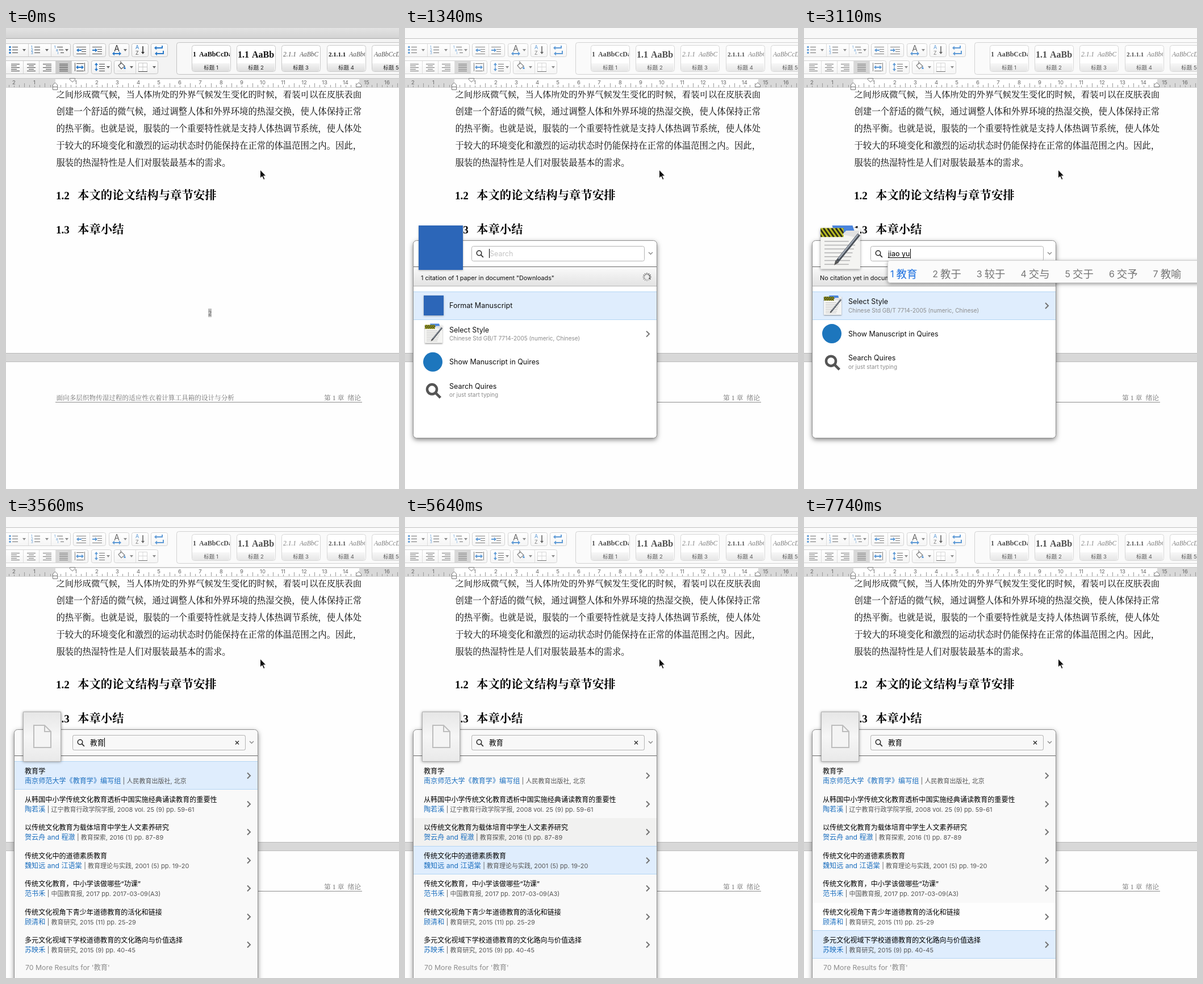
These frames come from a looping animation (692x810 px, 8 s). An HTML page with a canvas:

```html
<!DOCTYPE html>
<html lang="zh-CN">
<head>
<meta charset="utf-8">
<title>Citation search</title>
<style>
html, body { margin: 0; width: 100%; height: 100%; overflow: hidden; background: #fff; }
canvas { display: block; width: 692px; height: 810px; }
</style>
</head>
<body>
<canvas id="stage"></canvas>
<script>
const W = 692, H = 810, LOOP = 8000;
const canvas = document.getElementById('stage');
const g = canvas.getContext('2d');
const ratio = window.devicePixelRatio || 1;
canvas.width = W * ratio;
canvas.height = H * ratio;

const SANS = "Inter, 'Noto Sans CJK SC', 'Noto Sans CJK', sans-serif";
const SERIF = "'Liberation Serif', 'Noto Serif CJK SC', 'Noto Sans CJK SC', 'Noto Sans CJK', serif";
const BLUE = '#1c6fbf', INK = '#111';

// ---------- helpers ----------
function text(str, x, y, size, color = INK, style = '', family = SANS, align = 'left') {
  g.font = `${style} ${size}px ${family}`;
  g.fillStyle = color;
  g.textAlign = align;
  g.fillText(str, x, y);
  return g.measureText(str).width;
}
function rect(x, y, w, h, color) {
  g.fillStyle = color;
  g.fillRect(x, y, w, h);
}
function box(x, y, w, h, r, fill, stroke) {
  g.beginPath();
  g.roundRect(x + .5, y + .5, w, h, r);
  if (fill) { g.fillStyle = fill; g.fill(); }
  if (stroke) { g.strokeStyle = stroke; g.lineWidth = 1; g.stroke(); }
}
function path(points, color, width = 1, fill) {
  g.beginPath();
  points.forEach(([x, y], i) => i ? g.lineTo(x, y) : g.moveTo(x, y));
  if (fill) { g.closePath(); g.fillStyle = fill; g.fill(); }
  if (color) { g.strokeStyle = color; g.lineWidth = width; g.stroke(); }
}
function disc(x, y, r, fill, stroke, width = 1) {
  g.beginPath();
  g.arc(x, y, r, 0, Math.PI * 2);
  if (fill) { g.fillStyle = fill; g.fill(); }
  if (stroke) { g.strokeStyle = stroke; g.lineWidth = width; g.stroke(); }
}
function fade(y0, y1, ...colors) {
  const grad = g.createLinearGradient(0, y0, 0, y1);
  colors.forEach((c, i) => grad.addColorStop(i / (colors.length - 1), c));
  return grad;
}
function shadow(blur, dy, color) {
  g.shadowBlur = blur;
  g.shadowOffsetY = dy;
  g.shadowColor = color;
}
function layer(draw) { g.save(); draw(); g.restore(); }
// value of the latest [time, value] entry
function at(t, steps) {
  let value = steps[0][1];
  for (const [time, v] of steps) if (t >= time) value = v;
  return value;
}

// ---------- toolbar ----------
function lines(x, y, widths, color = '#444', gap = 3) {
  widths.forEach(([dx, w], i) => rect(x + dx, y + i * gap, w, 1, color));
}
function button(x, y, w, splits = []) {
  box(x, y, w, 23, 3, fade(y, y + 23, '#fff', '#f1f1f1'), '#c4c4c4');
  splits.forEach(s => rect(s, y + 1, 1, 22, '#d2d2d2'));
}
function drop(x, y) { path([[x - 3, y - 2], [x + 3, y - 2], [x, y + 2]], null, 0, '#666'); }
function arrow(x, y, dx, color = '#2878c8') {
  const s = Math.sign(dx);
  path([[x, y], [x + dx - s * 2, y]], color, 2);
  path([[x + dx, y], [x + dx - s * 4, y - 3.5], [x + dx - s * 4, y + 3.5]], null, 0, color);
}
function upDown(x, y, dy, color = '#2878c8') {
  const s = Math.sign(dy);
  path([[x, y], [x, y + dy - s * 2]], color, 1.6);
  path([[x, y + dy], [x - 3, y + dy - s * 4], [x + 3, y + dy - s * 4]], null, 0, color);
}
function toolRows() {
  button(-4, 27, 117, [39, 79]);
  for (let i = 0; i < 3; i++) {
    const y = 33 + i * 5;
    disc(7, y + .5, 1.8, '#2878c8');
    rect(11, y, 10, 1, '#444');
    text(i + 1, 44, y + 3, 6, '#2878c8');
    rect(50, y, 10, 1, '#444');
    text('1ai'[i], 85 + i * 3, y + 3, 6, '#2878c8');
    rect(90 + i * 3, y, 10 - i * 2, 1, '#444');
  }
  [32, 72, 107].forEach(x => drop(x, 39));

  button(118, 27, 57, [147]);
  [124, 152].forEach((x, i) => {
    lines(x, 33, [[0, 17], [9, 8], [9, 8], [0, 17]], '#555', 4);
    arrow(i ? x : x + 9, 39, i ? 9 : -9);
  });
  button(181, 27, 35);
  text('A', 195, 41, 14, '#333', '', SANS, 'center');
  arrow(195, 45, 8);
  arrow(195, 45, -8);
  drop(210, 39);
  button(221, 27, 29);
  text('A', 228, 37, 9, '#2878c8');
  text('Z', 228, 47, 9, '#555');
  upDown(241, 32, 14, '#333');
  button(255, 27, 29);
  path([[275, 31], [275, 35], [266, 35]], '#2878c8', 2);
  arrow(270, 35, -9);
  path([[277, 40], [277, 45], [268, 45]], '#2878c8', 2);
  arrow(274, 45, -12);

  button(-4, 57, 148, [30, 58, 87, 115]);
  rect(88, 58, 27, 22, '#cbcbcb');
  const full = [0, 15];
  lines(9, 63, [full, [0, 10], full, [0, 10], full]);
  lines(37, 63, [full, [3, 9], full, [3, 9], full]);
  lines(65, 63, [full, [5, 10], full, [5, 10], full]);
  lines(94, 63, [full, full, full, full, full]);
  lines(122, 62, [[2, 13], [2, 13]], '#444', 13);
  rect(121, 61, 1, 15, '#555');
  rect(138, 61, 1, 15, '#555');
  arrow(130, 69, 7);
  arrow(130, 69, -7);

  button(150, 57, 35);
  upDown(159, 68, -7);
  upDown(159, 69, 7);
  lines(164, 63, [[0, 10], [0, 10], [0, 10], [0, 10]], '#444', 4);
  drop(180, 69);
  button(190, 57, 77, [228]);
  path([[198, 66], [203, 61], [209, 67], [203, 72]], '#555', 1.2, '#fafafa');
  path([[202, 64], [202, 58]], '#555', 1);
  path([[209, 67], [211, 72], [207, 72]], null, 0, '#2878c8');
  rect(196, 74, 15, 3, '#eee');
  drop(221, 69);
  box(233, 61, 15, 15, 0, '#fff', '#c8c8c8');
  path([[241, 61], [241, 76]], '#c8c8c8');
  path([[233, 68.5], [249, 68.5]], '#c8c8c8');
  path([[233, 76.5], [249, 76.5]], '#444');
  drop(261, 69);
}
function styleCards() {
  box(300, 25, 420, 56, 4, '#f8f8f8', '#c2c2c2');
  const cards = [
    [['1', 2, 'bold', 12], ['AaBbCcDa', 13, 'bold', 12]],
    [['1.1', 2, 'bold', 16], ['AaBb', 27, 'bold', 16]],
    [['2.1.1', 3, 'italic', 11.5, '#555'], ['AaBbC', 32, 'italic', 11.5, '#555']],
    [['2.1.1.1', 3, 'bold', 11], ['AaBbC', 39, 'italic', 11.5, '#555']],
    [['AaBbCcDa', 4, 'italic', 11.5, '#555']]
  ];
  cards.forEach((parts, i) => {
    const x = 327 + Math.round(i * 79.2);
    box(x, 30, 68, 46, 4, '#fff', '#c9c9c9');
    layer(() => {
      g.beginPath();
      g.roundRect(x + 1, 31, 66, 45, 3);
      g.clip();
      rect(x, 62, 69, 15, fade(62, 76, '#f4f4f4', '#dedede'));
      parts.forEach(([s, dx, style, size, color]) =>
        text(s, x + dx, size > 13 ? 52 : 50, size, color || INK, style, SERIF));
    });
    text('标题 ' + (i + 1), x + 34, 73, 9.5, '#222', '', SANS, 'center');
  });
}
function ruler() {
  rect(0, 88, W, 17, '#d9d9d9');
  rect(87, 90, 535, 15, '#fff');
  rect(0, 88, W, 1, '#c6c6c6');
  for (let q = -9; q <= 67; q++) {
    const x = Math.round(86.7 + q * 36.52 / 4);
    const m = ((q % 4) + 4) % 4;
    if (m) rect(x, m === 2 ? 97 : 100, 1, m === 2 ? 7 : 4, '#999');
    else {
      rect(x, 101, 1, 3, '#999');
      if (q) text(Math.abs(q / 4), x, 99, 9.5, '#666', '', SANS, 'center');
    }
  }
  rect(0, 104, W, 1, '#d0d0d0');
  path([[82.5, 109], [82.5, 100], [86.5, 96], [90.5, 100], [90.5, 109]], null, 0, '#fff');
  path([[82.5, 108.5], [82.5, 100], [86.5, 96], [90.5, 100], [90.5, 108.5], [82.5, 108.5]], '#777');
  path([[82.5, 103.5], [90.5, 103.5]], '#777');
  path([[616.5, 103.5], [616.5, 100], [621, 96], [625.5, 100], [625.5, 103.5], [616.5, 103.5]], '#777', 1, '#fff');
  path([[112.5, 88.5], [121.5, 88.5], [121.5, 91], [117, 95], [112.5, 91], [112.5, 88.5]], '#777', 1, '#fff');
}
function toolbar(active) {
  rect(0, 0, W, 18, active ? fade(0, 18, '#e3e3e3', '#d3d3d3') : '#f5f5f5');
  rect(0, 18, W, 1, '#aaa');
  rect(0, 19, W, 69, active ? '#f3f3f3' : '#f9f9f9');
  toolRows();
  styleCards();
  if (!active) rect(0, 0, W, 88, 'rgba(255,255,255,.25)');
  ruler();
}

// ---------- document ----------
const BODY = [
  '之间形成微气候，当人体所处的外界气候发生变化的时候，着装可以在皮肤表面',
  '创建一个舒适的微气候，通过调整人体和外界环境的热湿交换，使人体保持正常',
  '的热平衡。也就是说，服装的一个重要特性就是支持人体热调节系统，使人体处',
  '于较大的环境变化和激烈的运动状态时仍能保持在正常的体温范围之内。因此，',
  '服装的热湿特性是人们对服装最基本的需求。'
];
function page(caret) {
  rect(0, 0, W, H, '#fefefe');
  BODY.forEach((s, i) => text(s, 88.5, 122 + i * 30.1, 15.36, '#000', '500', SERIF));
  if (caret) rect(383, 231, 1, 16, '#000');
  [['1.2', '本文的论文结构与章节安排', 301], ['1.3', '本章小结', 361]].forEach(([n, s, y]) => {
    text(n, 88, y, 19, '#000', 'bold', SERIF);
    text(s, 126, y, 20.4, '#000', 'bold', SERIF);
  });
  rect(356, 493, 6, 15, '#c0c0c0');
  text('2', 359, 505, 11.5, '#666', '', SERIF, 'center');
  rect(0, 571, W, 16, '#d8d8d8');
  rect(0, 571, W, 1, '#b9b9b9');
  rect(0, 586, W, 1, '#bcbcbc');
  text('面向多层织物传湿过程的适应性衣着计算工具箱的设计与分析', 88.5, 653.5, 11.62, '#6c6c6c', '500', SERIF);
  text('第 1 章  绪论', 625, 653.5, 11.8, '#6c6c6c', '500', SERIF, 'right');
  rect(87, 657, 540, 1, '#8c8c8c');
}
function pointer() {
  path([[447.5, 249], [447.5, 264], [451, 260.8], [453.6, 266.6], [456, 265.5], [453.4, 259.9], [458, 259.9], [447.5, 249]],
    '#fff', 1, '#111');
}

// ---------- panel ----------
function lens(x, y, r, width, color) {
  disc(x, y, r, null, color, width);
  const d = r * .75;
  path([[x + d, y + d], [x + d + r, y + d + r]], color, width);
}
function chevron(x, y) { path([[x - 3, y - 5], [x + 2, y], [x - 3, y + 5]], '#737373', 2); }

function notepad(x, y, k) {
  layer(() => {
    g.translate(x, y);
    g.scale(k, k);
    shadow(2 * k, 1, 'rgba(0,0,0,.4)');
    rect(1, 2, 31, 32, '#f4f4f2');
    shadow(0, 0, 'transparent');
    path([[10, 0], [26, 0], [28, 6], [12, 6]], null, 0, '#4a84dc');
    rect(1, 2, 18, 7, '#b9bd22');
    layer(() => {
      g.beginPath();
      g.rect(1, 2, 18, 7);
      g.clip();
      for (let i = -1; i < 7; i++) path([[i * 3.2, 2], [i * 3.2 + 5, 9]], '#2b2b1c', 1.3);
    });
    for (let i = 0; i < 7; i++) rect(4, 12 + i * 3, 19 + (i * 5) % 6, .7, '#b5b5b5');
    path([[18, 7], [21, 4], [31, 4], [32, 13], [27, 9]], null, 0, '#e2e2e2');
    path([[31, 7], [14, 28]], '#4a5058', 2.6);
    path([[30.4, 7], [15, 26]], '#a3acb8', 1);
    path([[15.3, 29], [12.7, 27], [11.6, 31]], null, 0, '#555');
  });
}
function emptyTile() {
  layer(() => {
    shadow(5, 1, 'rgba(0,0,0,.45)');
    rect(30, 342, 67, 87, '#eee');
  });
  box(30, 342, 66, 87, 0, fade(342, 429, '#e6e6e6', '#f6f6f6', '#e9e9e9'), '#b0b0b0');
  path([[49, 366], [68, 366], [79, 377], [79, 405], [49, 405], [49, 365]], '#bdbdbd', 2, '#f4f4f4');
  path([[68, 366], [68, 377], [79, 377]], '#bdbdbd', 2);
}
function square(x, y, s) {
  layer(() => {
    shadow(3, 1, 'rgba(0,0,0,.3)');
    rect(x, y, s, s, '#2c66b8');
  });
}
function frame(height, fill) {
  layer(() => {
    shadow(9, 3, 'rgba(0,0,0,.5)');
    box(14, 373, 429, height, 6, fill);
  });
  box(14, 373, 429, height, 6, fill, '#8f8f8f');
  rect(15, 419, 428, 1, '#666');
  box(117, 383, 304, 26, 3, '#fff', '#b4b4b4');
  lens(130.5, 395.5, 4.2, 1.5, '#222');
  path([[429, 394], [432.5, 397.5], [436, 394]], '#888', 1.4);
}
function selection(y, h) {
  rect(15, y, 428, h, '#dfedfd');
  rect(15, y, 428, 1, '#b4d6f4');
  rect(15, y + h - 1, 428, 1, '#b4d6f4');
}
function spinner(step) {
  for (let i = 0; i < 12; i++) {
    const a = (i + step) * Math.PI / 6, c = Math.cos(a), s = Math.sin(a);
    path([[426 + c * 4, 437.5 + s * 4], [426 + c * 7.5, 437.5 + s * 7.5]], `rgba(40,40,40,${.25 + i * .06})`, 1.5);
  }
}

const MENU = [
  ['Format Manuscript', '', (y) => square(33, y + 7, 35)],
  ['Select Style', 'Chinese Std GB/T 7714-2005 (numeric, Chinese)', (y) => notepad(34, y + 7, 1)],
  ['Show Manuscript in Quires', '', (y) => disc(49, y + 24.5, 17, '#1d76bd')],
  ['Search Quires', 'or just start typing', (y) => lens(47.5, y + 23, 8.5, 4.5, '#555')]
];
function menuPanel(cited, step) {
  frame(347, '#fff');
  rect(15, 420, 428, 34, fade(420, 454, '#fafafa', '#e2e2e2'));
  rect(15, 453, 428, 1, '#b5b5b5');
  text((cited ? '1 citation of 1 paper' : 'No citation yet') + ' in document "Downloads"', 28, 442.5, 10.8);
  if (cited) spinner(step);
  selection(463, 50);
  MENU.slice(cited ? 0 : 1).forEach(([title, note, icon], i) => {
    const y = 463 + i * 49.6;
    icon(y);
    text(title, 78, y + (note ? 22 : 29), 12.5);
    if (note) text(note, 78, y + 36.5, 10, '#8c8c8c');
    if (title === 'Select Style') chevron(428, y + 25);
  });
  if (cited) square(24, 347, 78);
  else notepad(27, 347, 2.25);
}

const IME = [
  [2080, 'j', '就 级 家 及 将 句 加 其'],
  [2220, 'ji', '及 级 几 机 记 即 急 集'],
  [2370, 'jiao', '叫 教 较 交 脚 角 觉 焦'],
  [2970, 'jiao y', '教育 教 叫 交易 较 交 脚 教研'],
  [3110, 'jiao yu', '教育 教于 较于 交与 交于 交予 教喻 郊域']
];
function compose(t) {
  const [, typed, list] = IME.filter(e => t >= e[0]).pop();
  const w = text(typed, 148, 401, 12.5, '#000');
  rect(148, 403, w, 1, '#000');
  rect(Math.round(148 + w), 388, 1, 17, '#000');
  const words = list.split(' ');
  const width = words.reduce((sum, s) => sum + 41 + s.length * 18.4, -20);
  layer(() => {
    shadow(7, 2, 'rgba(0,0,0,.45)');
    box(147, 408, width, 39, 4, '#fbfbfb');
  });
  box(147, 408, width, 39, 4, '#fbfbfb', '#d0d0d0');
  let x = 152;
  words.forEach((s, i) => {
    const color = i ? '#757575' : '#1a6fe0';
    x += text(i + 1, x, 438, 16, color) + 4;
    x += text(s, x, 438.5, 18.4, color) + 27;
  });
}

const RESULTS = [
  ['教育学', '南京师范大学《教育学》编写组', '人民教育出版社, 北京'],
  ['从韩国中小学传统文化教育透析中国实施经典诵读教育的重要性', '陶若溪', '辽宁教育行政学院学报, 2008 vol. 25 (9) pp. 59-61'],
  ['以传统文化教育为载体培育中学生人文素养研究', '贺云舟 and 程澈', '教育探索, 2016 (1) pp. 87-89'],
  ['传统文化中的道德素质教育', '魏知远 and 江语棠', '教育理论与实践, 2001 (5) pp. 19-20'],
  ['传统文化教育，中小学该做哪些“功课”', '范书禾', '中国教育报, 2017 pp. 2017-03-09(A3)'],
  ['传统文化视角下青少年道德教育的活化和链接', '顾清和', '教育研究, 2015 (11) pp. 25-29'],
  ['多元文化视域下学校道德教育的文化路向与价值选择', '苏映禾', '教育研究, 2015 (9) pp. 40-45']
];
const PICK = [[3560, 0], [4450, 1], [5040, 2], [5640, 3], [6240, 4], [6840, 5], [7740, 6]];
const BLINK = [[3560, 1], [4000, 0], [4590, 1], [5190, 0], [5790, 1], [6240, 0], [6840, 1], [7440, 0]];
// tint left for a moment on the row just passed
const TRAIL = [[0, ''], [4450, '#f5f5f5'], [4590, ''], [5640, '#f1f1f0'], [5790, ''], [7740, '#fefefe']];

function resultPanel(t) {
  const pick = at(t, PICK), trail = at(t, TRAIL);
  frame(500, '#f9f9f9');
  box(117, 383, 304, 26, 3, '#f8f8f8', '#b4b4b4');
  lens(130.5, 395.5, 4.2, 1.5, '#222');
  text('教育', 148, 401, 12.6, '#000');
  if (at(t, BLINK)) rect(173, 388, 1, 16, '#000');
  path([[404, 393.5], [410, 399.5]], '#333', 1.5);
  path([[410, 393.5], [404, 399.5]], '#333', 1.5);
  RESULTS.forEach(([title, author, origin], i) => {
    const y = Math.round(430.3 + i * 49.5);
    if (i === pick) selection(y - 1, 50);
    else if (trail && i === pick - 1) rect(15, y, 428, 49, trail);
    text(title, 33, y + 20.5, 12.1, '#000');
    const w = text(author, 33, y + 38, 12.1, BLUE);
    text('| ' + origin, 33 + w + 3.5, y + 38, 11, '#555');
    chevron(428, y + 24.5);
  });
  text("70 More Results for '教育'", 34, 796, 12.3, '#8c8c8c');
  emptyTile();
}

// ---------- timeline ----------
function draw(t) {
  g.setTransform(ratio, 0, 0, ratio, 0, 0);
  page(t >= 450 && t < 1040);
  layer(() => {
    g.beginPath();
    g.rect(0, 0, W, 110);
    g.clip();
    toolbar(t < 1040);
    rect(0, 105, 82, 5, '#fefefe');
    rect(91, 105, W, 5, '#fefefe');
  });
  pointer();
  if (t < 1040) return;
  if (t >= 3560) return resultPanel(t);
  layer(() => {
    g.globalAlpha = t < 1190 ? .5 : 1;
    menuPanel(t < 1780, Math.floor((t - 1040) / 148));
    if (t >= 2080) compose(t);
    else {
      text('Search', 149, 401, 12.5, '#c4c4c4');
      rect(148, 388, 1, 16, '#000');
    }
  });
}
const start = performance.now();
function tick() {
  draw((performance.now() - start) % LOOP);
  requestAnimationFrame(tick);
}
tick();
</script>
</body>
</html>
```
